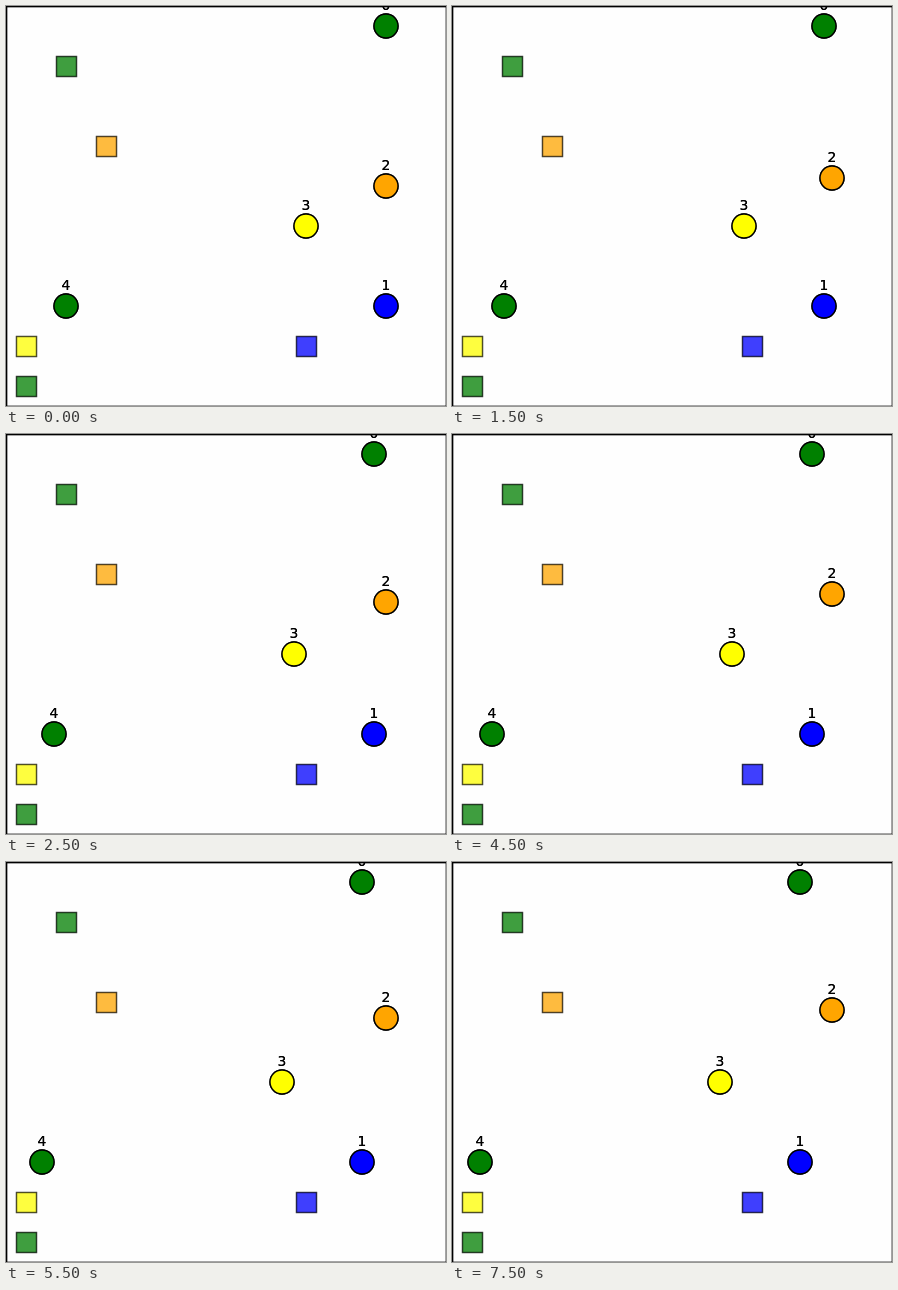
Recreate the animation shown at these times as an HTML page. Size 440 by 400 pixels, loop 8 s.

```html
<!DOCTYPE html>
<html lang="en">
<head>
<meta charset="utf-8">
<title>Agents moving on a grid</title>
<style>
  html, body { margin: 0; width: 100%; height: 100%; overflow: hidden; background: #fefefe; }
  svg { display: block; width: 440px; height: 400px; }
  rect, circle { stroke: #000; stroke-width: 1.39; }
  .goal { fill-opacity: .5; stroke-opacity: .5; }
  .frame { fill: none; }
  text { font: 13.89px "DejaVu Sans", sans-serif; text-anchor: middle; }
</style>
</head>
<body>
<svg id="stage" viewBox="0 0 440 400"></svg>
<script>
const LOOP = 8000, STEP_MS = 1000, STEP_PX = 4;

// centre x, centre y, colour
const goals = [
  [60, 60, 'green'], [100, 140, 'orange'], [300, 340, 'blue'],
  [20, 340, 'yellow'], [20, 380, 'green']
];
// start x, start y, colour, direction x, direction y
const agents = [
  [380, 20, 'green', -1, 0], [380, 300, 'blue', -1, 0], [380, 180, 'orange', 0, -1],
  [300, 220, 'yellow', -1, 0], [60, 300, 'green', -1, 0]
];

const stage = document.getElementById('stage');

function add(parent, tag, attrs = {}) {
  const el = document.createElementNS('http://www.w3.org/2000/svg', tag);
  for (const key in attrs) el.setAttribute(key, attrs[key]);
  return parent.appendChild(el);
}

function addScene() {
  add(stage, 'rect', { class: 'frame', x: .5, y: .5, width: 440, height: 400 });
  for (const [x, y, fill] of goals) {
    add(stage, 'rect', { class: 'goal', x: x - 9.5, y: y - 9.5, width: 20, height: 20, fill });
  }
  return agents.map(([, , fill], i) => {
    const g = add(stage, 'g');
    add(g, 'circle', { r: 12, fill });
    add(g, 'text', { y: -16 }).textContent = i;
    return g;
  });
}

// Painting everything twice gives the heavy edges and digits.
const layers = [addScene(), addScene()];

function draw(now) {
  const shift = Math.floor((now % LOOP) / STEP_MS + .5) * STEP_PX;
  agents.forEach(([x, y, , dx, dy], i) => {
    const place = `translate(${x + dx * shift} ${y + dy * shift})`;
    for (const groups of layers) groups[i].setAttribute('transform', place);
  });
}

const start = performance.now();
function tick() {
  draw(performance.now() - start);
  requestAnimationFrame(tick);
}
tick();
</script>
</body>
</html>
```
